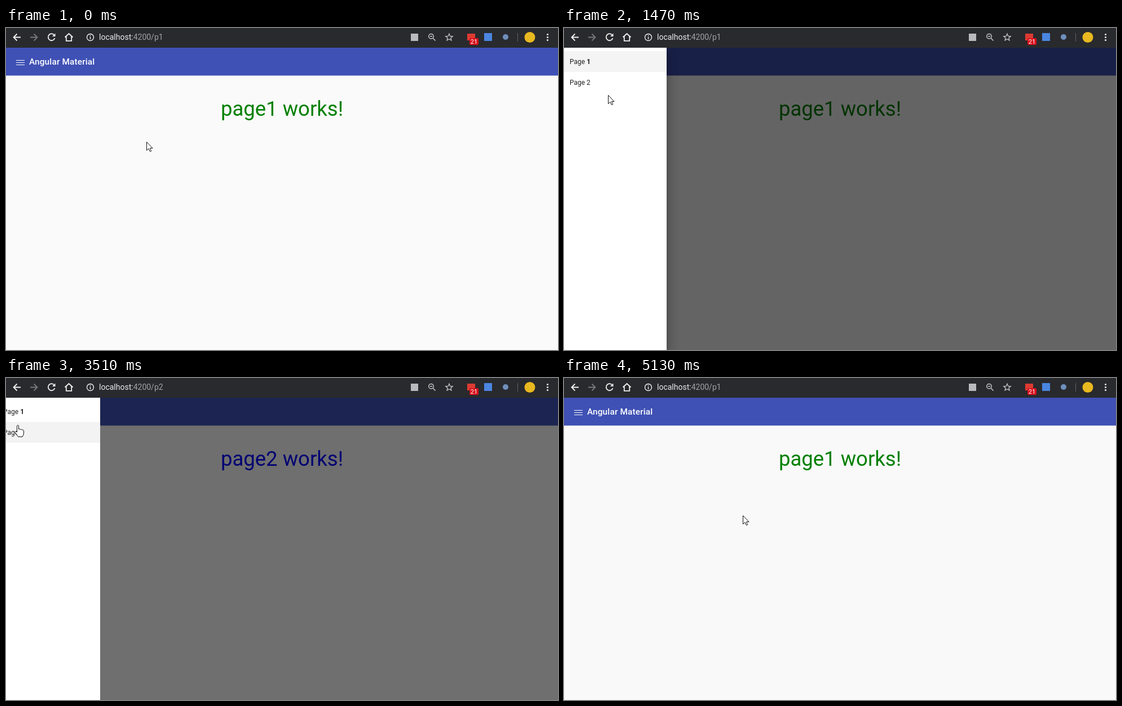
These frames come from a looping animation (979 by 572 pixels, 5380 ms). An HTML page:

```html
<!DOCTYPE html>
<html lang="en">
<head>
<meta charset="utf-8">
<title>Side navigation</title>
<style>
  html, body { margin: 0; width: 100%; height: 100%; overflow: hidden; }
  body { position: relative; background: #fafafa; font-family: Roboto, Arial, sans-serif; }
  svg { position: absolute; left: 0; top: 0; width: 979px; height: 572px; }
  #app { position: absolute; left: 0; top: 35px; width: 979px; height: 537px; overflow: hidden; }
  #app > div { position: absolute; }
  #toolbar { left: 0; top: 0; width: 979px; height: 49px; background: #3f51b5; box-shadow: 0 1px #3f51b580; }
  #title { position: absolute; left: 41px; top: 1px; line-height: 48px; color: #fff;
    font-size: 15.4px; font-weight: 500; letter-spacing: .15px; white-space: nowrap; }
  #menu { position: absolute; left: 18px; top: 22px; width: 15px; height: 9px; box-sizing: border-box;
    border: solid #fff; border-width: 1px 0; }
  #menu::after { content: ""; position: absolute; left: 0; top: 3px; width: 15px; height: 1px; background: #fff; }
  #heading { left: 0; top: 85px; width: 979px; text-align: center; font-size: 36.5px; line-height: 48px; }
  #backdrop { left: 0; top: 0; width: 979px; height: 537px; background: #000; }
  #drawer { left: 0; top: 0; width: 182px; height: 537px; background: #fff; padding-top: 6px; box-sizing: border-box; }
  #drawer.settled { box-shadow: 0 6px 8px -4px #0003, 0 12px 18px 2px #00000024, 0 4px 22px 4px #0000001f; }
  .row { height: 37px; line-height: 38px; padding-left: 10px; font-size: 12px; color: #000000de; }
  .row b { font-weight: 700; }
</style>
</head>
<body>
<div id="app">
  <div id="toolbar"><div id="menu"></div><div id="title">Angular Material</div></div>
  <div id="heading"></div>
  <div id="backdrop"></div>
  <div id="drawer">
    <div class="row" id="row1">Page <b>1</b></div>
    <div class="row" id="row2">Page 2</div>
  </div>
</div>
<svg viewBox="0 0 979 572">
  <rect width="979" height="35" fill="#292a2d"/>
  <g fill="none" stroke="#f1f1f1" stroke-width="1.8">
    <path d="M26 16.500H13.500M19.500 10.500L13.500 16.500L19.500 22.500"/>
    <path d="M43 16.500H55.500M49.500 10.500L55.500 16.500L49.500 22.500" stroke="#77787a"/>
    <path d="M85.500 12.500A6 6 0 1 0 86.500 18"/>
    <path d="M87.500 9.500V15H82Z" fill="#f1f1f1" stroke="none"/>
    <path d="M104.500 16.500L111.500 10L118.500 16.500M106.800 15V22.800H116.200V15"/>
    <g stroke-width="1.4">
      <circle cx="149.500" cy="16.500" r="6"/>
      <path d="M149.500 15.500V20M149.500 12.700V14.200"/>
    </g>
    <g stroke="#c6c7c9" stroke-width="1.5">
      <circle cx="754" cy="14.800" r="4.300"/>
      <path d="M757.300 18.200L761.500 22.500M752 14.800H756"/>
      <path d="M786 10.300L787.700 14.400L792.200 14.800L788.800 17.700L789.900 22L786 19.700L782.100 22L783.200 17.700L779.800 14.800L784.300 14.400Z" stroke-width="1.300"/>
    </g>
  </g>
  <rect x="718" y="10" width="13" height="13" fill="#b9babc"/>
  <rect x="818" y="10" width="14" height="12" fill="#dc3b32"/>
  <rect x="822" y="18" width="16" height="12" rx="2" fill="#d8101c"/>
  <text x="830" y="28" font-size="11" fill="#fff" text-anchor="middle">21</text>
  <rect x="848" y="9" width="14" height="14" fill="#4a86e0"/>
  <circle cx="886" cy="16" r="5" fill="#6f8fbd"/>
  <path d="M907.500 9V24" stroke="#5f6368"/>
  <circle cx="929" cy="16.500" r="9.500" fill="#e8b820"/>
  <g fill="#e8eaed"><circle cx="960.500" cy="11.500" r="1.600"/><circle cx="960.500" cy="16.500" r="1.600"/><circle cx="960.500" cy="21.500" r="1.600"/></g>
  <text x="165" y="21" font-size="14" fill="#e8eaed">localhost:<tspan id="path" fill="#a0a4a9"></tspan></text>
  <g id="cursor" fill="#fff" stroke="#111" stroke-linejoin="round">
    <path id="arrow" d="M.5 .5V15.500L4 12.300L6.400 17.600L8.700 16.600L6.400 11.500H11Z"/>
    <path id="hand" d="M-1.500 1.800Q0 -.5 1.500 1.800V8Q3 6.500 4.500 8.500Q6.200 7.200 7.500 9.200Q9.500 8.300 10.500 10.500V15Q10 19 8 21.500H.5Q-2 17.500 -5 13.500Q-4.500 11 -1.500 13Z"/>
  </g>
  <circle id="press" r="14.500" fill="#ff0" fill-opacity=".5"/>
</svg>
<script>
const LOOP = 5380, STEP = 77.7, WIDTH = 182, SLIDE = 5.15;
const $ = id => document.getElementById(id);

// All times below are in steps of STEP ms.
const path = [
  [0, 249, 202], [2, 186, 160], [4, 84, 100], [6, 22, 68], [7, 14, 64], [9, 28, 62],
  [13, 28, 62], [15, 40, 78], [19, 78, 119], [20, 70, 113], [22, 56, 104],
  [27, 56, 104], [29, 210, 195], [31, 376, 282], [34, 376, 282], [36, 116, 130],
  [38, 42, 74], [40, 28, 62], [43, 28, 62], [45, 21, 83], [48, 36, 64],
  [51, 36, 64], [54, 190, 150], [57, 317, 244]
];
const presses = [[11, 13], [25, 27], [32, 34], [41, 43], [49, 51], [61, 62]];
const slides = [[12.6, 1], [33.5, 0], [42.6, 1], [61.8, 0]];

const within = (k, a, b) => k >= a && k < b;

function ease(t) {
  if (t <= 0) return 0;
  if (t >= 1) return 1;
  let lo = 0, hi = 1, s;
  for (let i = 0; i < 24; i++) {
    s = (lo + hi) / 2;
    const x = .75 * s * (1 - s) + s ** 3;
    if (x < t) lo = s; else hi = s;
  }
  return 2.4 * s * (1 - s) ** 2 + 3 * s * s * (1 - s) + s ** 3;
}

function cursorAt(k) {
  const i = path.findIndex(p => p[0] > k);
  if (i < 0) return path[path.length - 1].slice(1);
  const [a, ax, ay] = path[i - 1], [b, bx, by] = path[i];
  const f = (k - a) / (b - a);
  return [Math.round(ax + (bx - ax) * f), Math.round(ay + (by - ay) * f)];
}

function drawerAt(k) {
  let open = 0;
  for (const [start, to] of slides) {
    if (k >= start) open += (to - open) * ease((k - start) / SLIDE);
  }
  return open;
}

function draw(k) {
  const [x, y] = cursorAt(k), open = drawerAt(k);
  const page = within(k, 28, 51) ? 2 : 1;

  $("path").textContent = "4200/p" + page;
  $("heading").textContent = `page${page} works!`;
  $("heading").style.color = page === 1 ? "green" : "blue";

  $("backdrop").style.opacity = .6 * open;
  $("drawer").style.transform = `translateX(${Math.round((open - 1) * WIDTH)}px)`;
  $("drawer").style.visibility = open * WIDTH < 2 ? "hidden" : "visible";
  $("drawer").className = open > .99 ? "settled" : "";
  $("row1").style.background = within(k, 49, 62) ? "#e9e9e9" : within(k, 17, 25) || k === 48 ? "#f4f4f4" : "";
  $("row2").style.background = within(k, 25, 34) ? "#e9e9e9" : within(k, 44, 48) ? "#f3f3f3" : "";

  const onMenu = open < .1 && x < 42 && within(y, 45, 79);
  const onRow = open > .1 && x < open * WIDTH && within(y, 41, 115);
  const hand = onMenu || onRow;
  $("arrow").style.display = hand ? "none" : "";
  $("hand").style.display = hand ? "" : "none";
  $("cursor").setAttribute("transform", `translate(${x} ${y})`);

  const pressed = presses.some(([a, b]) => within(k, a, b));
  $("press").style.display = pressed ? "" : "none";
  $("press").setAttribute("transform", `translate(${x} ${y})`);
}

const begin = performance.now();
function tick() {
  const t = (performance.now() - begin) % LOOP;
  draw(Math.min(68, Math.floor((t + 15) / STEP)));
  requestAnimationFrame(tick);
}
tick();
</script>
</body>
</html>
```
